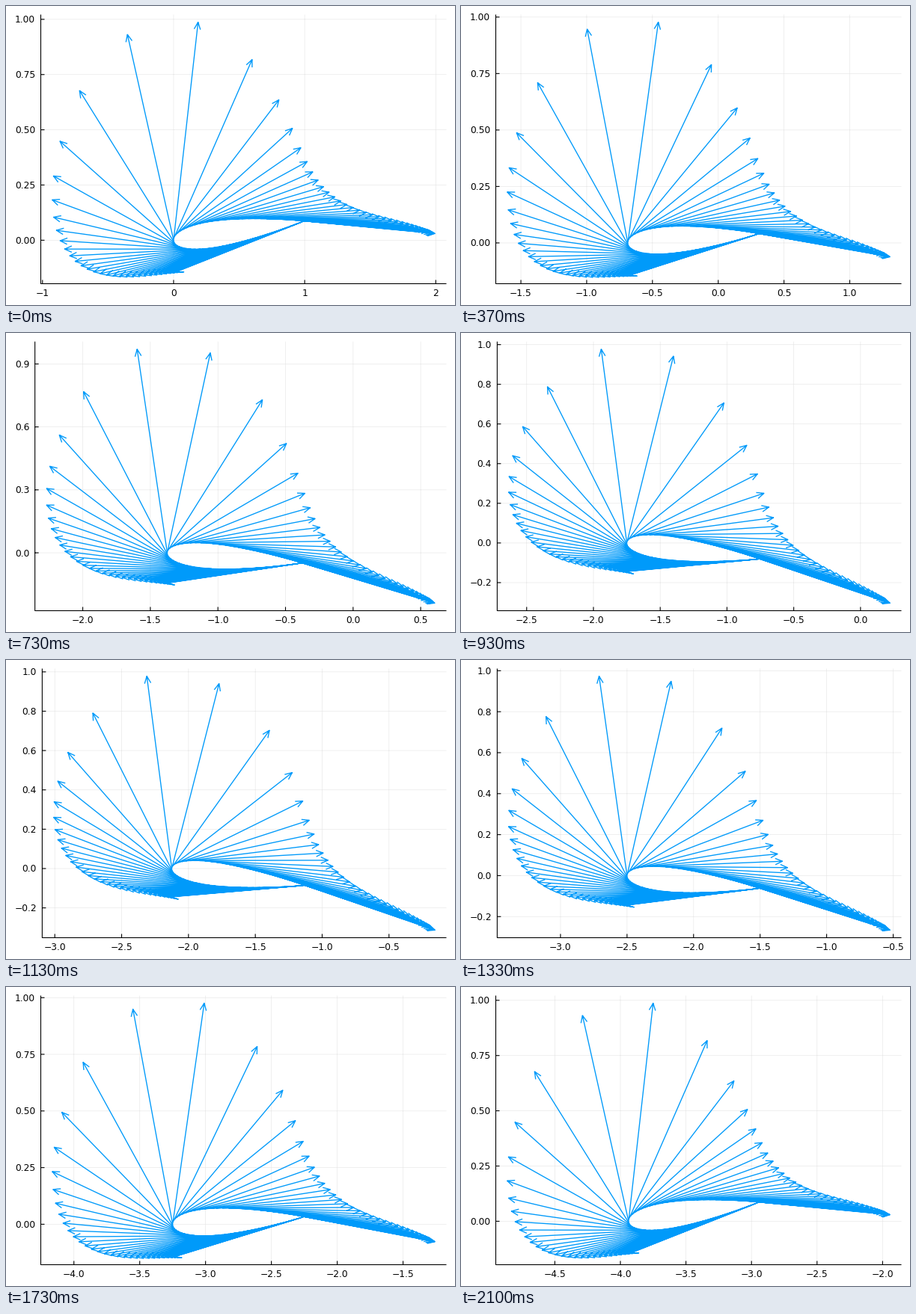
A matplotlib script for the animation above (2.13 s loop, 600x400 px).

```python
import math

import matplotlib.pyplot as plt
import numpy as np
from matplotlib.animation import FuncAnimation

plt.rcParams["font.family"] = "DejaVu Sans"
plt.rcParams["path.simplify"] = False

W, H, DPI = 600, 400, 100
POSES, LOOP, TICK = 64, 2130, 10
PANELS = 64
PITCH = math.radians(5)
TOP, RIGHT, BOTTOM = 11.5, 588.5, 371.5
EM = 12.3
BLUE = "#009AFA"
STEPS = [(1, 1.0), (0.5, 0.9), (0.3, 0.2), (0.25, 0.5), (0.2, 0.7), (0.1, 1.0)]


def px(n):
    return n * 72 / DPI


def naca(thick=0.12):
    """Closed symmetric foil: trailing edge, lower side, nose, upper side."""
    b = np.linspace(-np.pi, np.pi, PANELS + 1)
    x = (1 - np.cos(b)) / 2
    y = 5 * thick * (0.2969 * np.sqrt(x) - 0.126 * x - 0.3516 * x**2
                     + 0.2843 * x**3 - 0.1036 * x**4)
    return x, np.sign(b) * y


FOIL = naca()


def tangents(n):
    """Panel midpoints and the ends of their unit tangents."""
    a = PITCH * math.cos(2 * math.pi * n / POSES)
    c, s = math.cos(a), math.sin(a)
    x, y = FOIL
    p = np.column_stack([x * c - y * s - n / 16, x * s + y * c])
    d = np.diff(p, axis=0)
    mid = (p[1:] + p[:-1]) / 2
    return mid, mid + d / np.hypot(d[:, 0], d[:, 1])[:, None]


def ticks(lo, hi):
    """Best scoring round ticks inside the limits, with their labels."""
    best, pick = -1, None
    for step, nice in STEPS:
        i = np.arange(math.ceil(lo / step), math.floor(hi / step) + 1)
        k = len(i)
        if not 4 <= k <= 8:
            continue
        cover = 1.5 * (hi - lo) / ((k - 1) * step)
        score = (1 - abs(k - 5) / 5) / 4 + cover / 3 + nice / 4
        if score > best + 1e-9:
            best, pick = score, (i * step, step)
    at, step = pick
    digits = 0 if step == 1 else 2 if step == 0.25 else 1
    return at, [f"{v + 0.0:.{digits}f}".replace("-", "\u2212") for v in at]


def width(label):
    wide = {".": 0.318, "\u2212": 0.79}
    return EM * sum(wide.get(ch, 0.636) for ch in label)


def join(lines):
    """Stack polylines into one array, split by gaps."""
    gap = [[np.nan, np.nan]]
    return np.vstack([np.vstack([line, gap]) for line in lines]).T


fig = plt.figure(figsize=(W / DPI, H / DPI), dpi=DPI, facecolor="white")
ax = fig.add_axes([0, 0, 1, 1])
ax.set_xlim(0, W)
ax.set_ylim(H, 0)
ax.axis("off")


def pen(color, width_px, **kw):
    return ax.plot([], [], color=color, lw=px(width_px), snap=False,
                   solid_capstyle="butt", **kw)[0]


grid = pen("black", 0.7, alpha=0.09)
frame = pen("black", 1.1)
arrows = pen(BLUE, 1.35, solid_joinstyle="round")
labels = []


def write(x, y, s, align):
    labels.append(ax.text(x, y, s, ha=align, va="baseline",
                          fontsize=px(EM), color="black"))


def draw(tick):
    # 30 poses a second, each starting on the nearest 10 ms tick
    n = (3 * tick + 1) // 10
    while labels:
        labels.pop().remove()

    base, tip = tangents(n)
    pts = np.vstack([base, tip])
    lo, hi = pts.min(axis=0), pts.max(axis=0)
    pad = 0.03 * (hi - lo)
    lo, hi = lo - pad, hi + pad

    xt, xs = ticks(lo[0], hi[0])
    yt, ys = ticks(lo[1], hi[1])
    left = 19.1 + max(map(width, ys))

    def to_x(v):
        return left + (v - lo[0]) / (hi[0] - lo[0]) * (RIGHT - left)

    def to_y(v):
        return BOTTOM - (v - lo[1]) / (hi[1] - lo[1]) * (BOTTOM - TOP)

    rules = []
    marks = [[(left, TOP), (left, BOTTOM), (RIGHT, BOTTOM)]]
    for x, s in zip(to_x(xt), xs):
        rules.append([(x, TOP), (x, BOTTOM)])
        marks.append([(x, BOTTOM), (x, BOTTOM - 5)])
        write(x, 388, s, "center")
    for y, s in zip(to_y(yt), ys):
        rules.append([(left, y), (RIGHT, y)])
        marks.append([(left, y), (left + 5, y)])
        write(left - 7.3, y + 4.5, s, "right")
    grid.set_data(*join(rules))
    frame.set_data(*join(marks))

    strokes = []
    a = np.column_stack([to_x(base[:, 0]), to_y(base[:, 1])])
    b = np.column_stack([to_x(tip[:, 0]), to_y(tip[:, 1])])
    for p, q in zip(a, b):
        u = (q - p) / np.hypot(*(q - p))
        side = 4.2 * np.array([-u[1], u[0]])
        back = q - 9.5 * u
        strokes += [[p, q], [back + side, q, back - side]]
    arrows.set_data(*join(strokes))
    return [grid, frame, arrows, *labels]


anim = FuncAnimation(fig, draw, frames=LOOP // TICK, interval=TICK,
                     init_func=lambda: [], repeat=True, repeat_delay=0)
plt.show()
```
